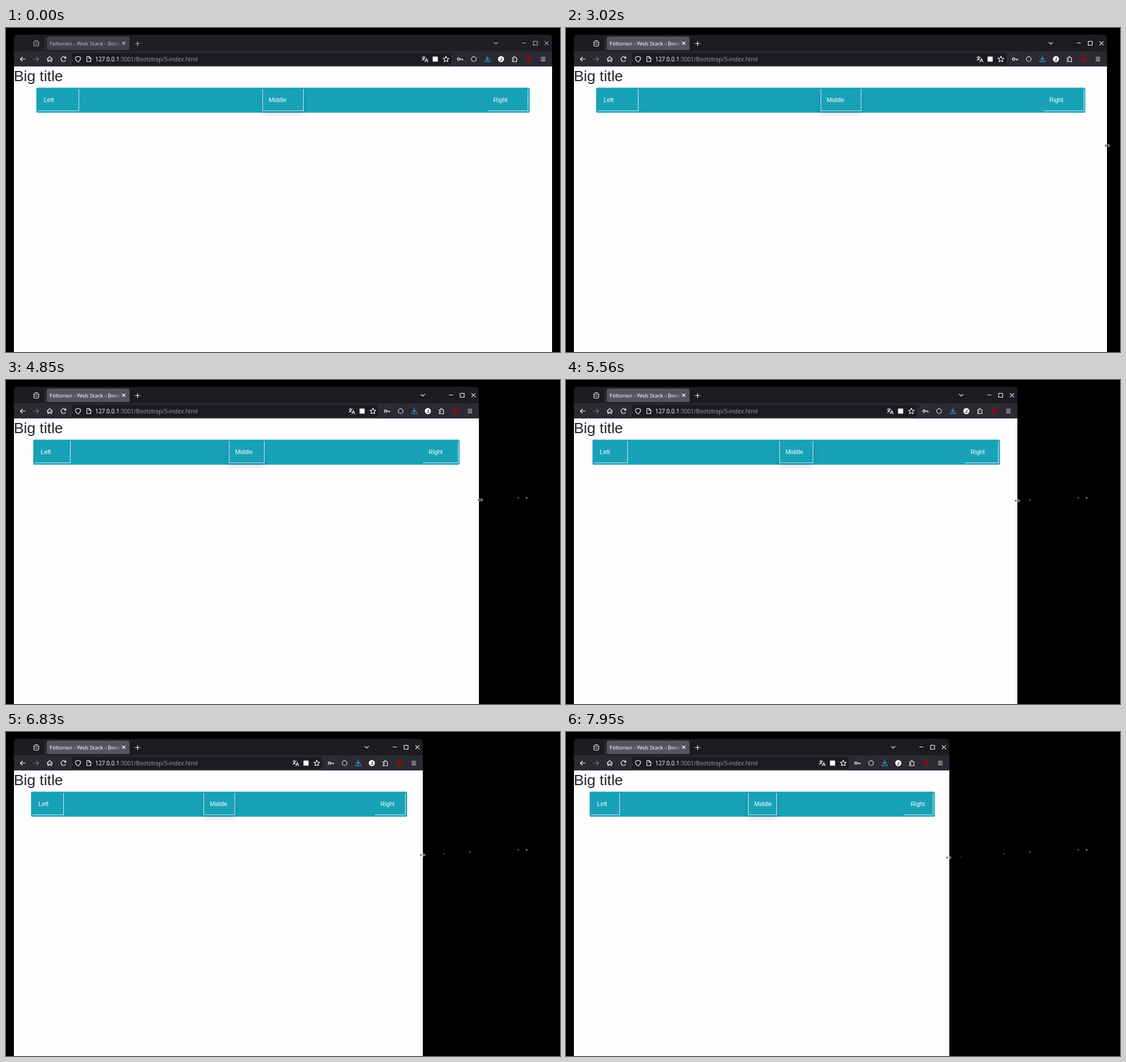
Write an HTML page that moves like this. It is 977x573 px and loops after 8000 ms.

```html
<!DOCTYPE html>
<html lang="en">
<head>
<meta charset="utf-8">
<title>Window resize</title>
<style>
  html, body { margin: 0; width: 100%; height: 100%; overflow: hidden; background: #000; }
  svg { display: block; }
  .ui { font: 10px "Noto Sans", "Open Sans", sans-serif; }
  .page { font-family: "Liberation Sans", Arial, sans-serif; }
  .icon { fill: none; stroke: #fbfbfe; stroke-width: 1.1; stroke-linecap: round; stroke-linejoin: round; }
  .solid { fill: #fbfbfe; stroke: none; }
  .item text { font-size: 10.56px; fill: #fff; }
  .line { fill: #f8f9fa; opacity: .85; }
</style>
</head>
<body>
<svg width="977" height="573" viewBox="0 0 977 573">
  <defs>
    <linearGradient id="fade" gradientUnits="userSpaceOnUse" x1="190" x2="203" y1="0" y2="0">
      <stop offset="0" stop-color="#fbfbfe"/>
      <stop offset="1" stop-color="#fbfbfe" stop-opacity="0"/>
    </linearGradient>
    <filter id="blur" x="-60%" y="-60%" width="220%" height="220%">
      <feGaussianBlur stdDeviation="5.28"/>
    </filter>
  </defs>
  <rect width="977" height="573"/>

  <!-- window frame -->
  <path id="strip"/>
  <rect id="toolbar" x="14" y="41" height="27" fill="#2b2a33"/>
  <rect id="field" x="117" y="44" height="21.5" rx="3" fill="#1c1b22"/>
  <rect x="68" y="12" width="1" height="29" fill="#3b3a44"/>
  <rect id="tab" x="71.5" y="15" width="146.5" height="24" rx="3"/>

  <g class="ui">
    <g id="tabParts">
      <text x="77" y="30.8" font-size="9.6" fill="url(#fade)">Feltorien - Web Stack - Bootstrap</text>
      <g class="icon">
        <path d="M205 24.5l5 5m0-5l-5 5M228 27.5h8m-4-4v8"/>
        <path d="M50.5 22.5h6M48.7 25h9.6M49.3 25v5.5q0 1.5 1.5 1.5h5.4q1.5 0 1.5-1.5V25M51.7 28.5h3.6"/>
      </g>
    </g>
    <text x="157.5" y="58.5" fill="#fbfbfe">127.0.0.1<tspan fill="#97969f">:3001/Bootstrap/5-index.html</tspan></text>
  </g>

  <g class="icon">
    <path d="M34 55h-8.5m3.5-3.7L25.3 55l3.7 3.7"/>
    <path d="M49 55h8.5M54 51.3l3.7 3.7-3.7 3.7" opacity=".4"/>
    <path d="M72.5 55l4.6-4.5 4.6 4.5M73.7 54.3v5h2.2v-3h2.4v3h2.2v-5"/>
    <path d="M105 53a4.2 4.2 0 1 0 .3 3.3M105.4 50.5v3h-3"/>
    <path d="M127 50.2l4.5 1.5q.2 6-4.5 8.3-4.7-2.3-4.5-8.3z"/>
    <path d="M142.5 50.5h4l3 3v6h-7zM146.5 50.5v3h3"/>
  </g>

  <!-- controls attached to the right edge -->
  <g id="right" class="icon">
    <g id="controls">
      <path d="M-102.5 25.2l3.5 3.5 3.5-3.5"/>
      <path d="M-52.5 26.5h6M-33 23.5h7v7h-7zM-12.7 23.8l6.4 6.4m0-6.4l-6.4 6.4"/>
    </g>
    <path d="M-229.5 51.7h6.5M-226.3 50v1.7M-224.5 51.7q-1 3.5-4.7 5.3M-228 53.5q1 2 3 3M-224 60l2.6-6 2.6 6m-4.5-2h3.8"/>
    <rect class="solid" x="-210.5" y="50.5" width="9" height="9"/>
    <path d="M-187 49.8l1.5 3.4 3.7.4-2.8 2.5.8 3.7-3.2-1.9-3.2 1.9.8-3.7-2.8-2.5 3.7-.4z"/>
    <path d="M-162.6 55h5.2v1.8M-159.7 55v1.5"/>
    <circle cx="-164.8" cy="55" r="2.1"/>
    <circle cx="-138" cy="55" r="4.2"/>
    <path d="M-114 50.2v6.3m-3-2.8l3 3 3-3M-118.3 57.3v2.2h8.6v-2.2" stroke="#1fb8e0" stroke-width="1.2"/>
    <circle class="solid" cx="-90" cy="55" r="5.4"/>
    <path d="M-89 52.8v3.2q0 1.4-1.2 1.4-.8 0-1.2-.5" stroke="#15141a"/>
    <path d="M-70 52.8h2.3v-1q0-1.5 1.4-1.5t1.4 1.5v1h2.5v6.7h-7.6v-2.3h1q1.3 0 1.3-1.2t-1.3-1.2h-1z"/>
    <circle cx="-41" cy="55" r="4.7" fill="#8b0a12" stroke="none"/>
    <path d="M-19.3 52h7m-7 3h7m-7 3h7"/>
  </g>

  <!-- page -->
  <rect id="paper" x="14" y="68" height="505" fill="#fefefe"/>
  <g class="page">
    <text x="13.7" y="94" font-size="26.5" fill="#212529">Big title</text>
    <rect id="bar" y="105.6" height="44.2" rx="2.6" fill="#17a2b8"/>
    <rect id="shade" y="113.5" height="38.8" opacity=".15" filter="url(#blur)"/>
    <rect id="cover" y="108.2" height="38.8" fill="#17a2b8"/>
    <g id="items"></g>
  </g>

  <g id="marks" fill="#ddd"></g>
  <path id="arrow" d="M.3.3v8l1.8-1.5 1.1 2.6 1.2-.5-1.1-2.5h2.3z" stroke="#fff" stroke-width=".5"/>
  <path id="resize" d="M-5 0l3.6-2.4v4.8zM5 0l-3.6-2.4v4.8z" stroke="#fff" stroke-width=".8"/>
</svg>
<script>
const LOOP = 8000, DRAG = 2692, TICK = 79.45;
const $ = id => document.getElementById(id);
const set = (el, attrs) => { for (const k in attrs) el.setAttribute(k, attrs[k]); };
const lerp = (a, b, f) => a + (b - a) * f;
const add = (parent, name, attrs) => {
  const el = document.createElementNS('http://www.w3.org/2000/svg', name);
  set(el, attrs);
  return parent.appendChild(el);
};

// tick, window edge, laid-out page edge, cursor x, cursor y
const drag = [
  [0, 963, 963, 964, 208], [4, 954, 955, 954.5, 208], [10, 928, 929, 928, 208],
  [13, 911, 912, 911, 209], [14, 911, 912, 911, 209], [17, 891, 892.7, 889, 209.5],
  [25, 846, 847, 848, 211], [27, 834, 834, 836, 212], [36, 796, 798, 796, 213.5],
  [45, 760.5, 763.5, 760.5, 215.5], [47, 756, 758, 756, 216], [58, 710, 713, 709, 219],
  [59, 706, 710, 703, 219.5], [66, 676, 678, 674.5, 222]
];

const items = ['Left', 'Middle', 'Right'].map((label, i) => {
  const g = add($('items'), 'g', { class: 'item' });
  const line = attrs => add(g, 'rect', { class: 'line', ...attrs });
  const part = {
    bottom: line({ y: 146, height: 1 }),
    side: line({ y: 108, width: 1, height: 38 }),
    left: i === 1 && line({ y: 108, width: 1, height: 38 }),
    text: add(g, 'text', { y: 131 })
  };
  part.text.textContent = label;
  return part;
});

// specks the cursor leaves behind: time, shape
const marks = [
  [3650, 'M917 207l3 1.6-3 1.6v-.9l1.3-.7-1.3-.7z'],
  [3950, 'M902.8 207.5l2 1.1-2 1.1z'],
  [5150, 'M817.2 211.5h1.3v2h-1.3z'],
  [6020, 'M772 214.7h1.3v1.2H772z'],
  [7550, 'M696.3 221h1.6v.8h-1.6z']
].map(([time, d]) => ({ time, el: add($('marks'), 'path', { d }) }));

function dragAt(tick) {
  const last = drag.length - 1;
  if (tick >= drag[last][0]) return drag[last];
  const i = drag.findIndex(k => k[0] > tick);
  const a = drag[i - 1], b = drag[i];
  const f = (tick - a[0]) / (b[0] - a[0]);
  return a.map((v, n) => lerp(v, b[n], f));
}

// share of a stepped move done at time t
const stepped = (t, start, steps) =>
  Math.max(0, Math.min(1, (Math.floor((t - start) / 80) + 1) / steps));

function pointerAt(t) {
  const f = stepped(t, 920, 5), g = stepped(t, 1480, 8);
  if (g > 0) return [lerp(863, 962, g), lerp(225, 208, g)];
  return [lerp(121, 863, f), lerp(236, 225, f) + 58 * Math.sin(Math.PI * f)];
}

function drawPage(edge) {
  const w = edge - 14, margin = w / 24;
  const x0 = 14 + margin, x1 = edge - margin;
  const inner = x1 - x0 - 5.28, cell = inner / 12;
  set($('bar'), { x: x0, width: x1 - x0 });
  items.forEach((part, i) => {
    const x = x0 + 2.64 + (inner - cell) * i / 2;
    const start = Math.round(x), end = Math.floor(x + cell);
    set(part.bottom, { x: start, width: end + 1 - start });
    set(part.side, { x: end });
    set(part.text, { x: x + 10.56 + (i === 1 ? .5 : 0) });
    if (part.left) {
      set(part.left, { x: start });
      set($('shade'), { x, width: cell });
      set($('cover'), { x: start, width: end + 1 - start });
    }
  });
}

function render(t) {
  const focused = t >= DRAG;
  const tick = focused ? Math.floor((t - DRAG) / TICK) : 0;
  const [, edge, page, cx, cy] = dragAt(tick);

  set($('strip'), {
    d: `M14 41V18q0-6 6-6H${edge - 6}q6 0 6 6V41z`,
    fill: focused ? '#1c1b22' : '#1f1e25'
  });
  set($('toolbar'), { width: edge - 14 });
  set($('paper'), { width: edge - 14 });
  set($('field'), { width: edge - 177.5 - 117 });
  set($('right'), { transform: `translate(${edge})` });
  set($('tab'), { fill: focused ? '#54535f' : '#403f4a' });
  set($('tabParts'), { opacity: focused ? 1 : .65 });
  set($('controls'), { opacity: focused ? 1 : .65 });
  drawPage(page);

  const resizing = t >= 2040;
  const [x, y] = focused ? [cx, cy] : pointerAt(t);
  set($('arrow'), { transform: `translate(${x} ${y})`, visibility: t >= 610 && !resizing ? 'visible' : 'hidden' });
  set($('resize'), { transform: `translate(${x} ${y})`, visibility: resizing ? 'visible' : 'hidden' });
  for (const m of marks) set(m.el, { visibility: t >= m.time ? 'visible' : 'hidden' });
}

const begin = performance.now();
function frame() {
  render((performance.now() - begin) % LOOP);
  requestAnimationFrame(frame);
}
frame();
</script>
</body>
</html>
```
